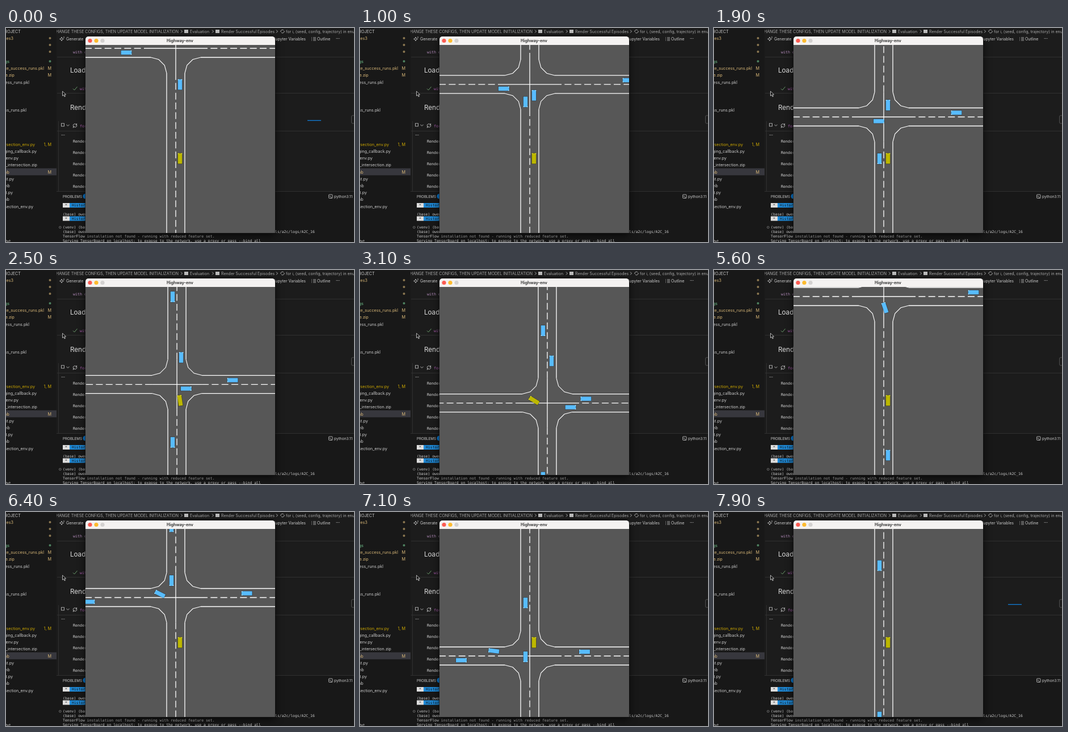
Animation of 613x379 px, one loop 8000 ms. Source, as an HTML page with a canvas:

```html
<!DOCTYPE html>
<html lang="en">
<head>
<meta charset="utf-8">
<title>Highway-env</title>
<style>
html, body { margin: 0; width: 100%; height: 100%; overflow: hidden; background: #1c1c1c; }
svg, canvas { position: absolute; left: 0; top: 0; }
canvas { left: 140px; top: 30px; }
text { font: 7px Inter, sans-serif; fill: #ccc; white-space: pre; }
.mono text { font: 6.45px "DejaVu Sans Mono", monospace; }
.code text { font: 6.65px "DejaVu Sans Mono", monospace; }
.head text { font-size: 11.6px; fill: #ddd; }
.files text { font-size: 7.2px; }
.icon { fill: none; stroke: #bbb; stroke-width: .9; }
</style>
</head>
<body>
<svg width="613" height="379" viewBox="0 0 613 379">
  <rect width="613" height="379" fill="#1c1c1c"/>
  <rect y="289" width="613" height="90" fill="#181818"/>
  <path d="M90 51.5H613M90 115.5H613M90 182.5H613M92.5 165V289M89 289.5H613" stroke="#303030" fill="none"/>
  <rect id="bar" y="163" width="24" height="1.4" fill="#1177cc"/>

  <g>
    <text x="304" y="8.5" text-anchor="end" style="fill:#aaa">CHANGE THESE CONFIGS, THEN UPDATE MODEL INITIALIZATION</text>
    <rect x="314" y="3" width="7" height="6" fill="#bbb"/>
    <text x="324" y="8.5" style="fill:#aaa">Evaluation</text>
    <rect x="369" y="3" width="7" height="6" fill="#bbb"/>
    <text x="379" y="8.5" style="fill:#aaa">Render Successful Episodes</text>
    <text x="493" y="8.5" style="fill:#aaa">for i, (seed, config, trajectory) in enumerate</text>
  </g>
  <g class="icon">
    <path d="M308 3.5l2.5 2.5-2.5 2.5M363 3.5l2.5 2.5-2.5 2.5M476 3.5l2.5 2.5-2.5 2.5"/>
    <path d="M484 7a3 3 0 0 1 5-3M490 5a3 3 0 0 1-5 3"/>
    <path d="M98 16l1 2.5 2.5 1-2.5 1-1 2.5-1-2.5-2.5-1 2.5-1zM102 15v3"/>
    <path d="M538 17h1M541 17h5M538 19.5h1M541 19.5h5M538 22h1M541 22h5"/>
    <path d="M118 107.5l2.5 2.5 5-6" stroke="#73a873"/>
    <path d="M106.5 171l2.5 2.5 2.5-2.5"/>
    <rect x="97.5" y="169" width="5" height="5"/>
    <path d="M118 173a3.5 3.5 0 0 1 6.5-1.5M125 172.5a3.5 3.5 0 0 1-6.5 1.5M124.5 169v3h-2M118.500 177v-3h2"/>
    <rect x="608.5" y="155" width="12" height="14" rx="2" stroke="#555"/>
    <rect x="568.5" y="295" width="6.5" height="6.5" rx="1"/>
    <path d="M570 297l1.500 1.300-1.500 1.300M572 300h2"/>
    <circle cx="95.3" cy="353" r="1.8" stroke="#777"/>
  </g>
  <text x="106" y="21.7">Generate</text>
  <text x="528" y="21.7" text-anchor="end">Jupyter Variables</text>
  <text x="548" y="21.7">Outline</text>
  <text x="581" y="20.5" style="font-weight:700">···</text>
  <text x="97" y="192" style="font-weight:700">···</text>
  <text x="100" y="300.7" style="font-size:6.3px">PROBLEMS</text>
  <circle cx="140" cy="298" r="4.5" fill="#0a78d0"/>
  <text x="578" y="300.7" style="font-size:6.6px">python3.11</text>

  <g class="head"><text x="113" y="79.2">Load</text><text x="113" y="144.7">Rend</text></g>
  <g class="code" id="code"></g>
  <g class="mono" id="term"></g>

  <rect width="89" height="379" fill="#181818"/>
  <rect y="248.5" width="89" height="12.3" fill="#37373d"/>
  <g class="files" id="files"></g>
  <path d="M99.5 112v8.2l2-1.8 1.5 3.3 1.4-.6-1.5-3.2h2.7z" fill="#111" stroke="#ddd" stroke-width=".8"/>

  <rect x="139.5" y="15" width="335" height="349" rx="5" fill="#111" style="filter:drop-shadow(0 4px 7px #0009)"/>
  <path d="M140 30.500V20a5 5 0 0 1 5-5H469a5 5 0 0 1 5 5V30.500z" fill="#f4f2f1"/>
  <circle cx="148" cy="22.5" r="3.6" fill="#fb5b52"/>
  <circle cx="159" cy="22.5" r="3.6" fill="#fdbb2e"/>
  <circle cx="170" cy="22.5" r="3.6" fill="#d3d1d0"/>
  <text x="306.5" y="25.1" text-anchor="middle" style="font-size:7.2px;font-weight:700;fill:#3a3a3a">Highway-env</text>
</svg>
<canvas id="view" width="334" height="333"></canvas>

<script>
const $ = id => document.getElementById(id);
const label = (x, y, text, color = '#ccc', anchor = 'start') =>
  `<text x="${x}" y="${y}" text-anchor="${anchor}" style="fill:${color}">${text}</text>`;

// Sidebar: right end of the name, row centre, name, colour, status
const gold = '#d9b878', green = '#73c991', plain = '#ccc';
$('files').innerHTML = [
  [26, 6, 'PROJECT', plain], [13, 18, 'ces3', gold, '•'], [0, 30, '', gold, '•'], [0, 42, '', gold, '•'],
  [6, 59, 'gs', green, '•'], [67, 71, 'te_success_runs.pkl', gold, 'M'], [15, 83, 'e.zip', gold, 'M'],
  [41, 96, 'cess_runs.pkl', plain], [36, 145, 'ss_runs.pkl', plain],
  [51, 206, 'ersection_env.py', '#cca700', '1, M'], [54, 218, 'ging_callback.py', plain],
  [22, 230, '_env.py', plain], [55, 242, '_intersection.zip', plain], [6, 255, 'nb', gold, 'M'],
  [14, 267, 'st.py', plain], [7, 279, 'nb', plain], [12, 291, 'st.py', plain],
  [6, 303, 'nb', plain], [48, 316, 'rsection_env.py', plain], [8, 377, 'txt', plain]
].map(([x, y, name, color, mark]) => label(x, y + 2.5, name, color, 'end') +
  (mark === '•' ? `<circle cx="77.5" cy="${y}" r="2" fill="${color}" opacity=".6"/>`
    : mark ? label(80, y + 2.5, mark, color, 'end') : '')).join('');

$('code').innerHTML = label(118, 44.5, 'with o', '#b98fc0') + label(130, 109.5, 'wit', '#b05fb5') +
  label(130, 175.5, 'for', '#b05fb5') + [201, 221, 241, 261, 281].map(y => label(118, y + 2.4, 'Render', '#ddd')).join('');

const history = y => `<rect x="100" y="${y - 4}" width="12" height="8" fill="#ddd"/>
  <rect x="112" y="${y - 4}" width="30" height="8" fill="#1f8ad8"/>` +
  label(104, y + 2.4, '*', '#222') + label(116, y + 2.4, 'History', '#111');
$('term').innerHTML = history(314) + history(337.5) +
  label(100, 331.7, '(base) owen') + label(100, 355.2, '(venv) (base)') + label(100, 363.2, '(base) owen') +
  label(474, 363.2, 'ls/a2c/logs/A2C_16') +
  label(100, 371, 'TensorFlow installation not found - running with reduced feature set.') +
  label(100, 378.8, 'Serving TensorBoard on localhost; to expose to the network, use a proxy or pass --bind_all');

// World units are pixels around the crossing; 4 px per metre
const LANE = 7.5, EDGE = 16, OUTER = 44, FAR = 900, TURN = 52;
const ctx = $('view').getContext('2d');

function between(keys, t) {
  let i = 1;
  while (i < keys.length - 1 && t > keys[i][0]) i++;
  const [t0, a] = keys[i - 1], [t1, b] = keys[i];
  return a + (b - a) * (t - t0) / (t1 - t0);
}

// Direction: 0 right, 1 down, 2 left, 3 up; p is the distance past the crossing
function straight(dir, p) {
  const a = dir * Math.PI / 2, c = Math.cos(a), s = Math.sin(a);
  return { x: c * p - s * LANE, y: s * p + c * LANE, a };
}

// Northbound, then left on an arc; the heading lags a little behind the path
function leftTurn(s) {
  const arc = TURN * Math.PI / 2, u = s - 152;
  if (u < 0) return { x: LANE, y: 195 - s, a: -Math.PI / 2 };
  const f = Math.min(u, arc) / TURN, rest = Math.max(0, u - arc);
  const lag = Math.min(f, .14) * Math.max(0, 1 - rest / 260);
  return { x: TURN * Math.cos(f) - 44.5 - rest, y: 43 - TURN * Math.sin(f), a: lag - f - Math.PI / 2 };
}

// Traffic: direction, starting distance, speed per second
const episodes = [
  {
    start: 0,
    ego: t => leftTurn(between([[0, 0], [1.9, 121.5], [3.1, 212], [4.1, 414], [5.45, 780]], t)),
    cars: [[3, -64, 44.7], [0, -87, 41.3], [1, -17, 47.9], [2, -223, 50], [1, -267.5, 45],
      [0, -406, 45], [0, -512, 45], [0, -582.5, 45]],
    turning: () => []
  },
  {
    start: 5.6,
    ego: t => straight(3, between([[-.15, -204], [0, -184], [.8, -79.5], [1.5, 24], [2.3, 190]], t)),
    cars: [[2, -158, 41], [3, -281, 45], [1, -66, 45], [1, -161.5, 45], [0, -188, 45], [1, -429.5, 45]],
    turning: t => [leftTurn(176 + 51 * t)]
  }
];

function line(...points) {
  ctx.beginPath();
  points.forEach(p => ctx.lineTo(...p));
  ctx.stroke();
}

function roads() {
  ctx.strokeStyle = '#fff';
  for (let arm = 0; arm < 4; arm++) {
    ctx.lineWidth = 1.3;
    for (const side of [-EDGE, EDGE]) line([OUTER, side], [FAR, side]);
    line([0, 0], [OUTER, 0]);
    ctx.setLineDash([12, 5.33]);
    line([OUTER, 0], [FAR, 0]);
    ctx.setLineDash([]);
    ctx.lineWidth = 1.1;
    line(...[0, 1, 2, 3].map(k => {
      const a = Math.PI * (1 + k / 6);
      return [OUTER + 28 * Math.cos(a), OUTER + 28 * Math.sin(a)];
    }));
    ctx.rotate(Math.PI / 2);
  }
}

function car({ x, y, a }, color, light) {
  ctx.save();
  ctx.translate(x, y);
  ctx.rotate(a);
  ctx.fillStyle = color;
  ctx.fillRect(-9.5, -3.8, 19, 7.6);
  ctx.strokeStyle = '#0007';
  ctx.lineWidth = .6;
  ctx.strokeRect(-9.7, -4, 19.4, 8);
  ctx.fillStyle = light;
  for (const side of [-3.8, 2.4]) ctx.fillRect(7.9, side, 1.4, 1.4);
  ctx.restore();
}

function draw(t) {
  const ep = episodes[t < 5.45 ? 0 : 1], local = t - ep.start, ego = ep.ego(local);
  ctx.setTransform(1, 0, 0, 1, 0, 0);
  ctx.fillStyle = '#575757';
  ctx.fillRect(0, 0, 334, 333);
  ctx.translate(166.5 - ego.x, 201 - ego.y);
  roads();
  const traffic = ep.cars.map(([dir, p, v]) => straight(dir, p + v * local));
  for (const pose of [...traffic, ...ep.turning(local)]) car(pose, '#58bcff', '#d5f2ff');
  car(ego, '#bdb800', '#eeea60');

  // Progress strip crosses the editor every four seconds
  $('bar').setAttribute('x', 93 + (438 + 130 * t) % 520);
}

const began = performance.now();
function frame() {
  const ms = (performance.now() - began) % 8000;
  draw(Math.floor(ms / 100) / 10);
  requestAnimationFrame(frame);
}
frame();
</script>
</body>
</html>
```
